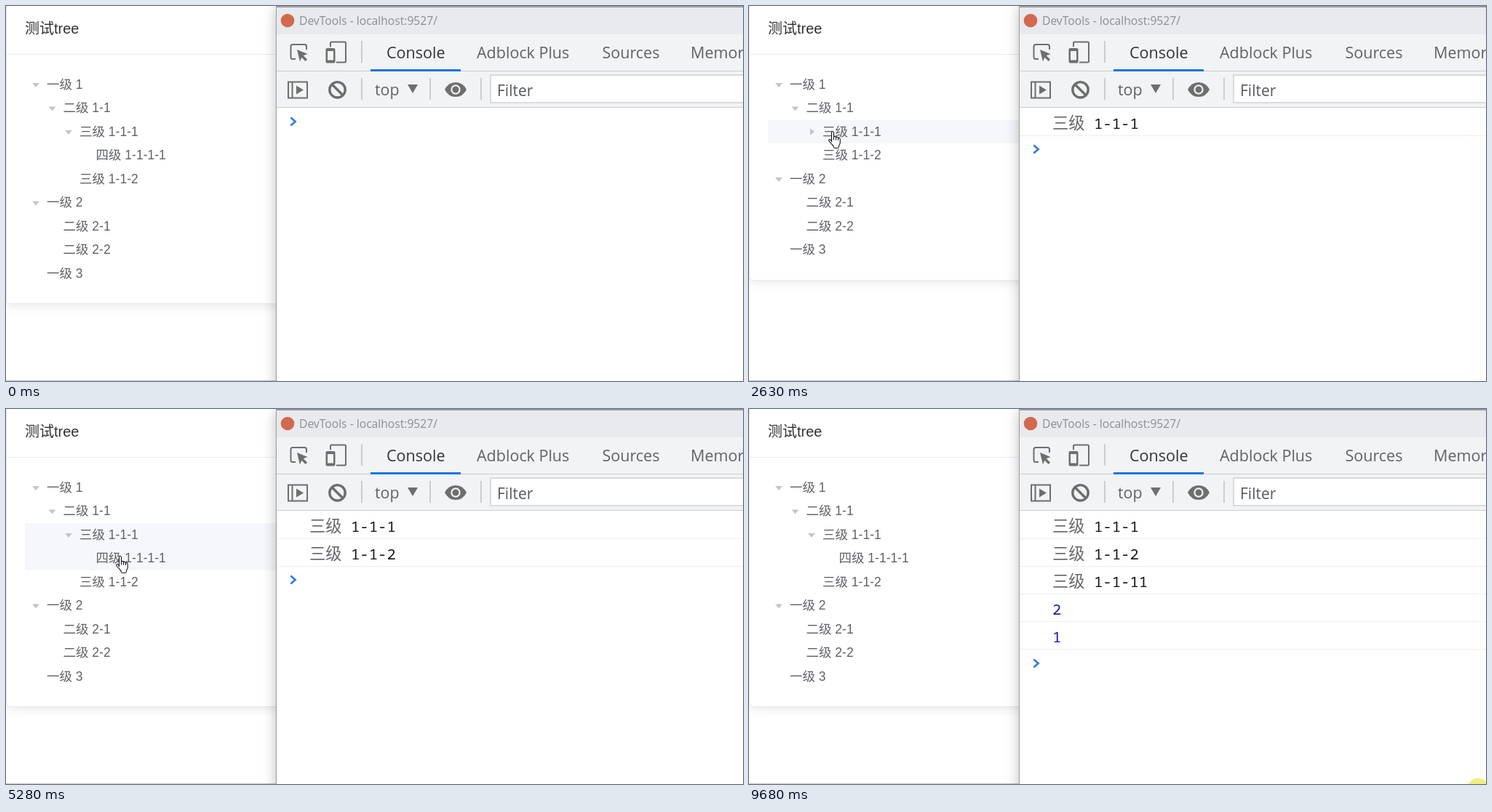
Animation of 1013x516 px, one loop 9880 ms. Source, as an HTML page with a canvas:

```html
<!DOCTYPE html>
<html lang="zh-CN">
<head>
<meta charset="utf-8">
<title>Tree click log</title>
<style>
html, body { margin: 0; width: 100%; height: 100%; overflow: hidden; background: #fff; }
canvas { display: block; }
</style>
</head>
<body>
<canvas id="stage" width="1013" height="516"></canvas>
<script>
const W = 1013, H = 516, LOOP = 9880;
const ctx = document.getElementById('stage').getContext('2d');
const SANS = '"Liberation Sans", "Noto Sans CJK SC", "Noto Sans CJK", sans-serif';
const UI = '"Open Sans", "Noto Sans", sans-serif';
const MONO = '"Noto Sans Mono", monospace';
const CJK = '"Noto Sans CJK SC", "Noto Sans CJK", sans-serif';
const ICON = '#6e6e6e';

// Tree rows: label, depth, has children
const ROW = 32.5, TOP = 92;
const nodes = [
  ['一级 1', 0, 1], ['二级 1-1', 1, 1], ['三级 1-1-1', 2, 1],
  ['四级 1-1-1-1', 3, 0], ['三级 1-1-2', 2, 0], ['一级 2', 0, 1],
  ['二级 2-1', 1, 0], ['二级 2-2', 1, 0], ['一级 3', 0, 0]
];
const PARENT = 2, CHILD = 3;

// Clicks: press, release, focused row, logged text
const clicks = [
  [1400, 1680, 2, '三级 1-1-1'],
  [3510, 3780, 4, '三级 1-1-2'],
  [4740, 4940, 2, ''],
  [5550, 5740, 3, '三级 1-1-11'],
  [7180, 7380, 6, '2'],
  [8320, 8520, 8, '1'],
  [9680, LOOP, -1, '']
];

// Pointer stops: time, x, y
const stops = [
  [150, 632, 518], [390, 436, 395], [530, 436, 395], [1130, 212, 169],
  [2220, 212, 169], [2841, 78, 173], [3310, 109, 202], [4040, 109, 202],
  [4470, 91, 167], [4935, 91, 167], [5270, 156, 202], [6075, 156, 202],
  [6905, 124, 303], [7575, 124, 303], [8050, 125, 370], [8785, 125, 370],
  [9250, 1002, 523]
];

const handPath = new Path2D('M4.5 14V2.5Q4.5 .5 6 .5T7.5 2.5V8.5Q8 7 9.3 7.3 10.5 7.7 10.5 9 11 7.8 12.2 8.2 13.5 8.6 13.5 10 14 9 15 9.4 16.3 10 16.3 12V16Q16.3 18 14.6 20V21.5Q14.4 23.5 12.5 23.5H9Q7.2 23.5 7 21.5V20.5Q4 17.5 .8 13.5 .5 11.5 2.2 11.5 3.5 12 4.5 14Z');
const arrowPath = new Path2D('M.5 .5V19.5L5 15.4 7.8 22 11 20.6 8.2 14.3H14.3Z');

const clamp = u => Math.max(0, Math.min(1, u));
const ease = u => { u = clamp(u); return u * u * (3 - 2 * u); };

function box(x, y, w, h, color) {
  ctx.fillStyle = color;
  ctx.fillRect(x, y, w, h);
}

function text(s, x, y, size, color, family, weight = 400) {
  ctx.font = `${weight} ${size}px ${family}`;
  ctx.fillStyle = color;
  ctx.fillText(s, x, y);
}

function shape(d, fill, stroke, width = 1) {
  const p = typeof d === 'string' ? new Path2D(d) : d;
  if (fill) { ctx.fillStyle = fill; ctx.fill(p); }
  if (stroke) { ctx.strokeStyle = stroke; ctx.lineWidth = width; ctx.stroke(p); }
}

function shadow(color, blur, dy) {
  ctx.shadowColor = color;
  ctx.shadowBlur = blur;
  ctx.shadowOffsetY = dy;
}

function pointerAt(t) {
  let i = 0;
  while (i < stops.length - 1 && stops[i + 1][0] <= t) i++;
  const a = stops[i], b = stops[i + 1] || a;
  const u = ease((t - a[0]) / (b[0] - a[0] || 1));
  return { x: a[1] + (b[1] - a[1]) * u, y: a[2] + (b[2] - a[2]) * u };
}

// 1 = branch fully open, 0 = closed
const openness = t => t < 3500 ? 1 - ease((t - 1660) / 300) : ease((t - 4925) / 300);

function layout(open) {
  let y = TOP;
  return nodes.map((n, i) => {
    const h = i === CHILD ? ROW * open : ROW, r = { y, h };
    y += h;
    return r;
  });
}

function caret(x, y, turn) {
  ctx.save();
  ctx.translate(x, y);
  ctx.rotate(turn * Math.PI / 2);
  shape('M-2 -4.8L4 0 -2 4.8Z', '#c0c4cc');
  ctx.restore();
}

function drawCard(open, rows, hover, focus) {
  const bottom = 377.5 + ROW * open;
  ctx.save();
  const card = new Path2D();
  card.roundRect(.5, -40, 420, Math.round(bottom) + 39.5, 5);
  shadow('rgba(0,0,0,.1)', 15, 2.5);
  shape(card, '#fff');
  shadow('transparent', 0, 0);
  shape(card, null, '#e4e8f1');
  ctx.restore();
  box(1, 66, 371, 1, '#e6eaf3');
  text('测试tree', 26, 38, 20, '#303133', SANS);

  rows.forEach(({ y, h }, i) => {
    if (h < .5) return;
    const [label, depth, kids] = nodes[i];
    ctx.save();
    ctx.beginPath();
    ctx.rect(0, y - .5, 372, h + 1);
    ctx.clip();
    if (i === hover || i === focus) {
      const top = Math.floor(y);
      box(26, top, 346, Math.floor(y + h) - top, '#f5f7fa');
    }
    const x = 26 + depth * 22.5;
    if (kids) caret(x + 15, y + 16, i === PARENT ? open : 1);
    text(label, x + 30, Math.floor(y + 22), 17.5, '#606266', SANS);
    ctx.restore();
  });
  box(0, 515, 372, 1, '#c6c6c6');
}

function drawToolbar() {
  box(372, 2, 641, 37, '#e8eaed');
  box(372, 39, 641, 101, '#f1f3f4');
  box(372, 89, 641, 1, '#cacdd1');
  box(372, 139, 641, 1, '#cacdd1');

  ctx.beginPath();
  ctx.arc(387, 20, 9.3, 0, 7);
  ctx.fillStyle = '#d2694f';
  ctx.fill();
  text('DevTools - localhost:9527/', 403, 26, 15.65, '#8b8e92', UI);

  // Inspect and device icons
  shape('M398 73H394Q391.5 73 391.5 70.5V55.5Q391.5 53 394 53H410.5Q413 53 413 55.5V60', null, ICON, 2);
  shape('M400 60L414.5 66 408.7 68.2 414 73.5 411.6 76 406.3 70.7 404 76.5Z', ICON);
  shape('M446 56V51Q446 49.5 447.5 49.5H465.5Q467 49.5 467 51V76Q467 77.5 465.5 77.5H454', null, ICON, 2);
  shape('M440.5 58H450.5Q452.5 58 452.5 60V76.5Q452.5 78.5 450.5 78.5H441.5Q439.5 78.5 439.5 76.5V60Q439.5 58 441.5 58ZM442 62V74.5H450V62Z', ICON);
  box(488, 48, 2, 30, '#cbcdd0');

  const tab = (s, x, color) => text(s, x, 71.5, 21.5, color, UI);
  tab('Console', 523, '#333639');
  tab('Adblock Plus', 647, '#5f6368');
  tab('Sources', 819.5, '#5f6368');
  tab('Memory', 941, '#5f6368');
  box(501, 87, 124, 3, '#1a73e8');

  // Sidebar, clear, eye
  ctx.strokeStyle = ICON;
  ctx.lineWidth = 2;
  ctx.strokeRect(388, 104.5, 26, 22);
  box(392.5, 104, 2, 23, ICON);
  shape('M399 109.5L409 115.5 399 121.5Z', ICON);
  ctx.beginPath();
  ctx.arc(455.5, 115.3, 10.7, 0, 7);
  ctx.lineWidth = 3.4;
  ctx.stroke();
  shape('M448 107.8L463 122.8', null, ICON, 3.4);
  text('top', 507, 123, 21.4, '#5f6368', UI);
  shape('M552 108H566L559 120Z', ICON);
  shape('M603 115Q608 105 618 105T633 115Q628 125 618 125T603 115Z', ICON);
  ctx.beginPath();
  ctx.arc(618, 115, 5.6, 0, 7);
  ctx.lineWidth = 2.2;
  ctx.strokeStyle = '#f1f3f4';
  ctx.stroke();
  for (const x of [488, 582, 652]) box(x, 99, 2, 30, '#cbcdd0');

  box(665, 94, 348, 40, '#d8dadc');
  box(667, 96, 346, 36, '#fff');
  text('Filter', 675, 124, 21, '#55585c', UI);
}

function drawConsole(log) {
  ctx.save();
  shadow('rgba(0,0,0,.26)', 17, 2);
  box(371, 0, 700, 600, '#9a9c9e');
  ctx.restore();
  box(372, 2, 641, 514, '#fff');
  drawToolbar();

  const pitch = 38.2;
  log.forEach((line, i) => {
    const y = Math.round(168.5 + i * pitch);
    const [word, digits] = line.split(' ');
    if (digits) {
      text(word, 417, y, 22.3, '#66686b', CJK, 300);
      text(digits, 474, y, 20.6, '#151618', MONO, 500);
    } else {
      text(line, 417, y, 20.6, '#1a1aa6', MONO, 500);
    }
    box(372, Math.round(177.6 + i * pitch), 641, 1, '#eeeeee');
  });
  const y = Math.round(158.5 + log.length * pitch);
  shape(`M391.3 ${y - 5.5}L397.6 ${y} 391.3 ${y + 5.5}`, null, '#2f7ae5', 2.6);
}

function drawPointer(p, hand, pressed) {
  if (pressed) {
    ctx.beginPath();
    ctx.arc(p.x, p.y, 15, 0, 7);
    ctx.fillStyle = 'rgba(228,224,0,.5)';
    ctx.fill();
  }
  ctx.save();
  ctx.translate(Math.round(p.x) - (hand ? 5 : 0), Math.round(p.y));
  shape(hand ? handPath : arrowPath, '#fff', '#111', 1.1);
  if (hand) shape('M7.5 8V12.5M10.5 9V12.5M13.5 10V13', null, '#111', 1);
  ctx.restore();
}

function draw(t) {
  const s = Math.floor((t + 14) / 67.8) * 67.8 - 14;
  const open = openness(s), rows = layout(open), p = pointerAt(s);
  const hover = p.x >= 26 && p.x < 371
    ? rows.findIndex(r => p.y >= r.y && p.y < r.y + r.h) : -1;
  const begun = clicks.filter(c => t >= c[0]);
  const last = begun[begun.length - 1];
  const log = begun.filter(c => t >= c[1] && c[3]).map(c => c[3]);

  box(0, 0, W, H, '#fff');
  drawCard(open, rows, hover, last ? last[2] : -1);
  drawConsole(log);
  drawPointer(p, hover >= 0, last && t < last[1]);
}

function tick() {
  draw(performance.now() % LOOP);
  requestAnimationFrame(tick);
}
tick();
</script>
</body>
</html>
```
